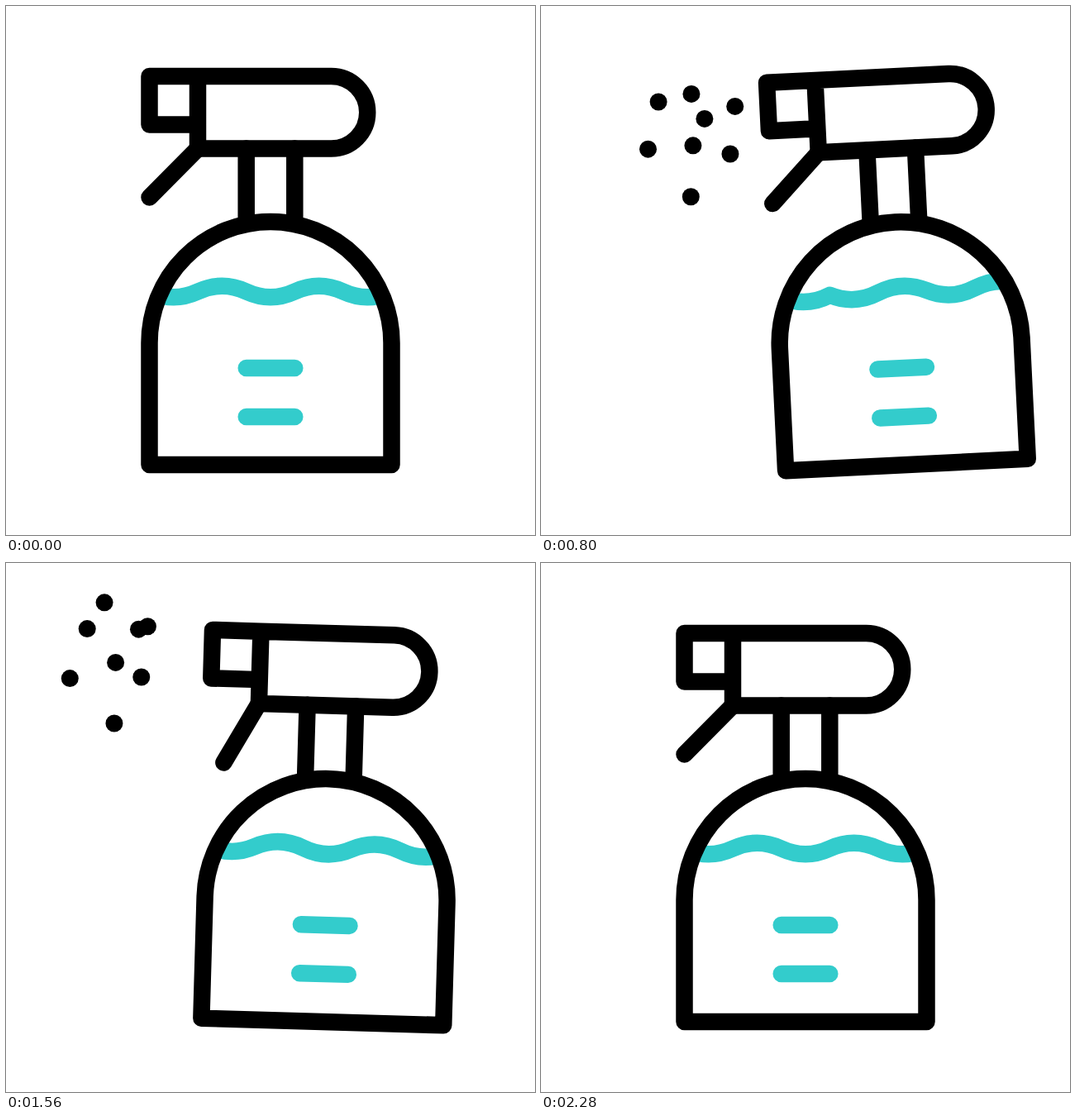
Recreate the animation shown at these times as an HTML page. Size 640 by 640 pixels, loop 2.4 s.

```html
<!DOCTYPE html>
<html lang="en">
<head>
<meta charset="utf-8">
<title>Spray bottle</title>
<style>
  html, body { margin: 0; height: 100%; overflow: hidden; background: #fff; }
  svg { display: block; width: 100%; height: 100%; }
  .line { fill: none; stroke: #000; stroke-width: 20.5; stroke-linecap: round; stroke-linejoin: round; }
  .teal { stroke: #3cc; }
</style>
</head>
<body>
<svg viewBox="0 0 640 640">
  <defs>
    <path id="body" d="M173.5 555V407.5A146.5 146.5 0 0 1 466.5 407.5V555Z"/>
    <clipPath id="inside"><use href="#body"/></clipPath>
  </defs>
  <g id="spray"></g>
  <g id="bottle" class="line">
    <g clip-path="url(#inside)"><path id="wave" class="teal"/></g>
    <path class="teal" d="M290.7 438H349.3M290.7 497H349.3"/>
    <path d="M290.7 172.5V262M349.3 172.5V262"/>
    <use href="#body"/>
    <path d="M232 85H393.5a43.75 43.75 0 0 1 0 87.5H232ZM232 85H173.5V143.5H232"/>
    <path id="trigger" d="M232 172.5L173.5 231.5"/>
  </g>
</svg>
<script>
const LOOP = 2400, BURSTS = [660, 1220], WIDTH = 293;
const $ = id => document.getElementById(id);
const clamp = v => Math.max(0, Math.min(1, v));

function ease(t, start, end) {
  const u = clamp((t - start) / (end - start));
  return u * u * (3 - 2 * u);
}

// Each drop: where it appears and how far it flies.
const drops = [
  [219, 73, -151, -38], [171, 73, -110, 10], [272, 82, -152, -8], [224, 102, -96, -33],
  [216, 131, -126, -16], [162, 129, -128, 16], [267, 138, -156, 0], [213, 188, -124, 9]
].map(([x, y, dx, dy]) => {
  const dot = document.createElementNS("http://www.w3.org/2000/svg", "circle");
  dot.setAttribute("r", 10.5);
  $("spray").append(dot);
  return { dot, x, y, dx, dy };
});

// Two copies of the water line, each as wide as the body.
const halfWave = WIDTH / 5;
const ripple = `q${halfWave / 2} 13.5 ${halfWave} 0` + `t${halfWave} 0`.repeat(4);
$("wave").setAttribute("d", "M173.5 345.5" + ripple + ripple);

function drawBottle(t) {
  const aim = ease(t, 0, 480), kick = ease(t, 660, 900);
  const pump = ease(t, 1160, 1320), home = ease(t, 1240, 1900);
  const recoil = ease(t, 1340, 1560), settle = ease(t, 1640, 1900);
  const x = 86.2 * aim + 57.5 * kick - 23 * pump - 120.7 * home;
  const tilt = -16.27 * aim + 21.37 * kick - 10.1 * pump + 6.66 * recoil - 1.66 * settle;
  const pull = aim - ease(t, 660, 790) + ease(t, 1200, 1360) - ease(t, 1440, 1654);
  const flow = -WIDTH * (0.413 * aim + 0.587 * kick);
  $("bottle").setAttribute("transform", `translate(${x}) rotate(${tilt} 320 555)`);
  $("trigger").setAttribute("transform", `rotate(${-38.8 * pull} 232 172.5)`);
  $("wave").setAttribute("transform", `translate(${flow})`);
}

function drawSpray(t) {
  const first = t < BURSTS[1];
  const age = t - BURSTS[first ? 0 : 1];
  const u = (age - 60) / 440, flight = u * (1.1 - 0.1 * u);
  $("spray").setAttribute("transform", first ? "translate(-7 41)" : "");
  for (const { dot, x, y, dx, dy } of drops) {
    dot.setAttribute("cx", x + dx * flight);
    dot.setAttribute("cy", y + dy * flight);
    dot.setAttribute("opacity", clamp(age / 100) * clamp((570 - age) / 70));
  }
}

function draw() {
  const t = performance.now() % LOOP;
  drawBottle(t);
  drawSpray(t);
  requestAnimationFrame(draw);
}
draw();
</script>
</body>
</html>
```
